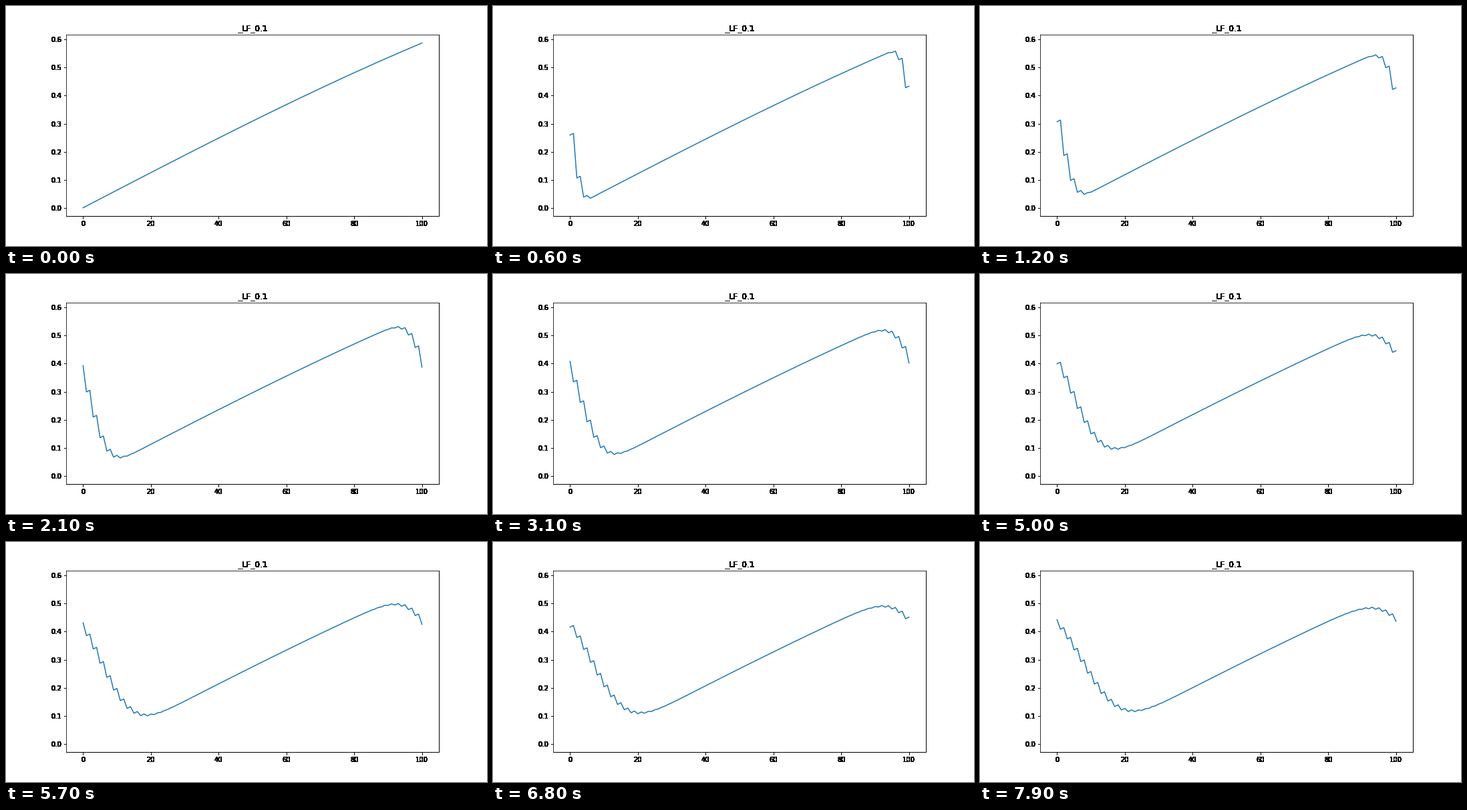
A matplotlib script for the animation above (8000 ms loop, 720 by 360 pixels).

```python
import matplotlib.pyplot as plt
import numpy as np
from matplotlib.animation import FuncAnimation

COURANT = 0.1
CELLS = 101
FRAMES = 80
INTERVAL = 100


def lax_friedrichs(u):
    """One step of linear advection on a periodic grid."""
    left, right = np.roll(u, 1), np.roll(u, -1)
    return (left + right) / 2 - COURANT / 2 * (right - left)


def solve():
    states = [np.sin(0.2 * np.pi * np.arange(CELLS) / (CELLS - 1))]
    while len(states) < FRAMES:
        states.append(lax_friedrichs(states[-1]))
    return states


def hard_backdrop(fig):
    """Render on a clear ground and drop alpha, so that edges off the panel turn solid."""
    fig.patch.set_facecolor((1, 1, 1, 0))
    fig.canvas.draw()
    rgba = np.array(fig.canvas.buffer_rgba())
    rgb = rgba[..., :3].copy()
    rgb[rgba[..., 3] == 0] = 255
    fig.patch.set_facecolor("white")
    return rgb


plt.rcParams["font.family"] = "DejaVu Sans"
plt.rcParams["font.size"] = 10

states = solve()
fig, ax = plt.subplots(figsize=(10, 5), dpi=72)
fig.subplots_adjust(left=0.125, right=0.9, bottom=0.125, top=0.88)
line, = ax.plot(states[0], color="C0", lw=1.5)
ax.set_title("_LF_0.1")

# The static parts are drawn once; only the curve stays live.
line.set_visible(False)
backdrop = hard_backdrop(fig)
fig.figimage(backdrop, origin="upper", zorder=-1)
ax.set_title("")
ax.set_axis_off()
ax.set_autoscale_on(False)
line.set_visible(True)


def update(i):
    line.set_ydata(states[i % FRAMES])
    return line,


anim = FuncAnimation(fig, update, frames=FRAMES, interval=INTERVAL,
                     repeat=True, repeat_delay=0, blit=False)
plt.show()
```
